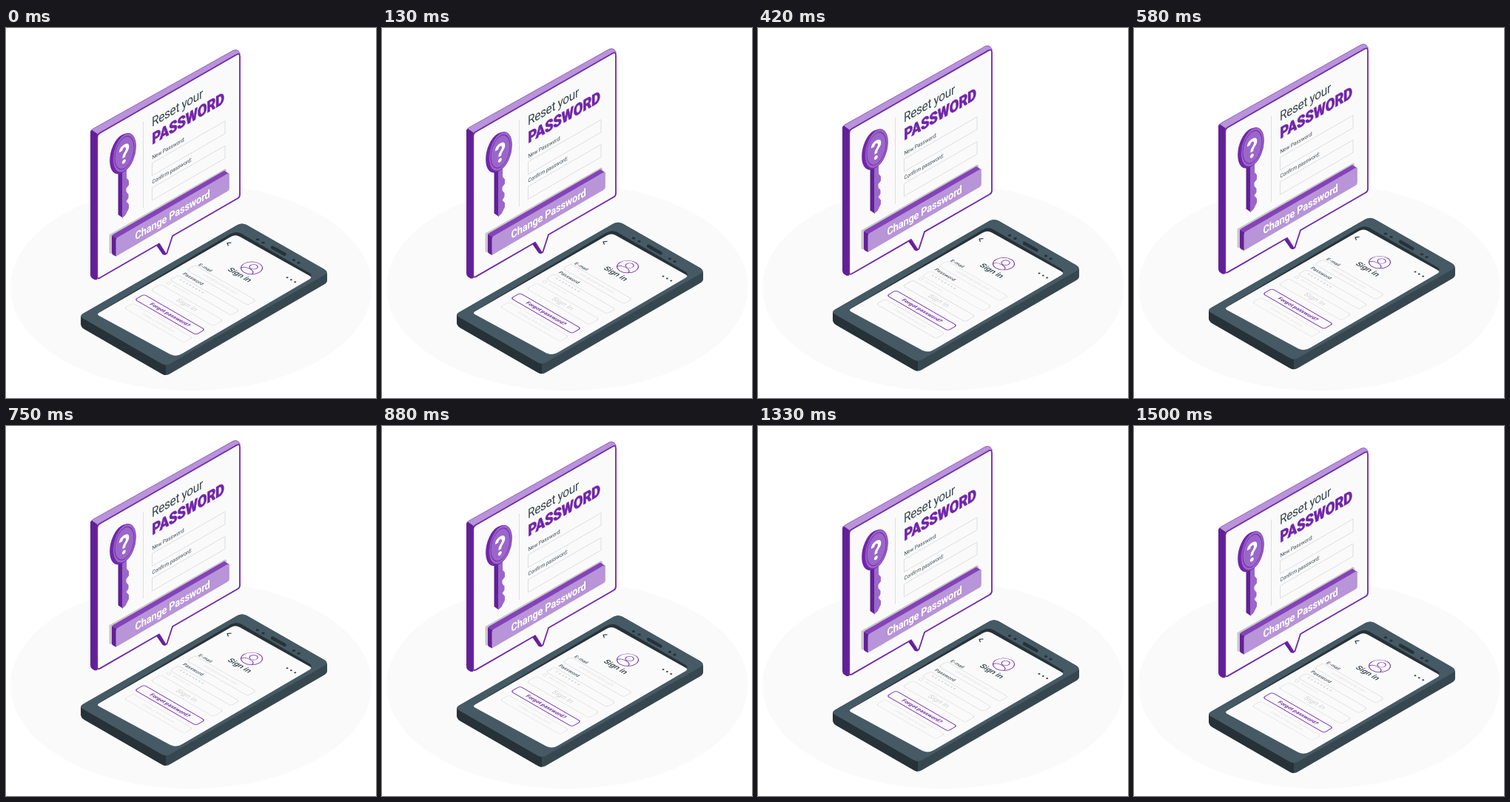
An HTML page that plays this animation: 500x500 px, repeating every 1.54 s.

```html
<!DOCTYPE html>
<html lang="en">
<head>
<meta charset="utf-8">
<title>Reset your password</title>
<style>
  html, body { margin: 0; width: 100%; height: 100%; overflow: hidden; background: #fff; }
  svg { display: block; width: 100vw; height: 100vh; }
  text { font-family: Roboto, sans-serif; }
  .wide text { font-family: Inter, sans-serif; }
</style>
</head>
<body>
<svg id="stage" viewBox="0 0 500 500"></svg>
<script>
const MAIN = '#7126a9', DARK = '#622095', MID = '#9b66ca', LIGHT = '#b894d8';
const PAPER = '#fafafa', INK = '#37474f', NIGHT = '#263238', SLATE = '#455a64', LINE = '#dcdcdc', FAINT = '#e0e0e0';
const LOOP = 1540, SWING = 1500, LIFT = 10;

const path = (d, fill, extra = '') => `<path d="${d}" fill="${fill}" ${extra}/>`;
const line = (d, color, w) => path(d, 'none', `stroke="${color}" stroke-width="${w}" stroke-linecap="round" stroke-linejoin="round"`);
const oval = (x, y, rx, ry, fill, extra = '') => `<ellipse cx="${x}" cy="${y}" rx="${rx}" ry="${ry}" fill="${fill}" ${extra}/>`;

// Isometric planes: the upright panel and the lying screen
const wall = (x, y, body) => `<g transform="matrix(.866 -.5 0 1 ${x} ${y})">${body}</g>`;
const flat = (x, y, body) => `<g transform="matrix(.866 .5 -.866 .5 ${x} ${y})">${body}</g>`;

const label = (str, size, color, weight = 400, extra = '') =>
  `<text font-size="${size}" font-weight="${weight}" fill="${color}" ${extra}>${str}</text>`;
const centred = (x, y, str, size, color, weight) =>
  flat(x, y, label(str, size, color, weight, `text-anchor="middle" y="${size * 0.34}"`));
const pill = (x, y, w, h, color, stroke = 0.9) =>
  flat(x, y, `<rect x="${-w / 2}" y="${-h / 2}" width="${w}" height="${h}" rx="3.5" fill="${PAPER}" stroke="${color}" stroke-width="${stroke}"/>`);

function phone() {
  const dots = (list, r, fill) => list.map(([x, y]) => oval(x, y, r * 1.25, r * 0.85, fill)).join('');
  const avatar = `<g fill="none" stroke="${MAIN}" stroke-width=".9"><circle r="11.8"/><circle cy="-3" r="4.6"/>
    <path d="M-8.6 8.1 Q-8 2.6 0 2.6 Q8 2.6 8.6 8.1"/></g>`;
  const body = [
    path('M104 386 L313 266 Q319 263 325 266 L430 326 Q434 329 434 333 V341 Q434 344 430 346.500 L222 467 Q216 471 210 467 L106 407 Q101 404 101 399 V391 Q101 388 104 386Z', INK),
    path('M101 390 L106 393 L216 456 V469 Q213 469 210 467 L106 407 Q101 404 101 399Z', NIGHT),
    path('M104 386 L313 266 Q319 263 325 266 L430 326 Q437 330 430 334 L222 453.500 Q216 457 210 453.500 L105 393 Q98 389.500 104 386Z', SLATE),
    path('M125 384.500 L303 278.500 Q311 273.800 318 277.800 L410 331 Q415 334 410 338 L300 400 L126 387Z', NIGHT),
    path('M126 384.500 L304 282 Q310 278.500 316 282 L410 334.700 Q414.500 337 410 339.500 L238 440 Q230 445 222 441 L126 389 Q122 386.800 126 384.500Z', PAPER),
    line('M360 296.500 L376.500 305.800', NIGHT, 4.4),
    dots([[340, 285.8], [347.5, 290], [389, 313.5], [395.5, 317.3]], 1.8, NIGHT)
  ];
  const header = [
    line('M304 290.200 L299 290.700 L300.300 294', INK, 1.3),
    dots([[380, 337.2], [385.3, 340.2], [390.7, 343.2]], 1.2, INK),
    flat(332, 324.3, avatar),
    centred(316, 333.6, 'Sign in', 10.3, INK, 600)
  ];
  const form = [
    pill(291, 347.5, 95, 13, FAINT),
    centred(290, 346, 'user@example.com', 5.6, FAINT),
    centred(269.5, 324, 'E-mail', 6.4, INK, 500),
    pill(268.5, 361, 95, 13, FAINT),
    centred(250, 349.5, '* * * * * * * *', 6.2, '#bdbdbd'),
    centred(253, 338.9, 'Password', 6.5, INK, 500),
    flat(220, 344.5, `<rect x="-2" y="-2" width="4" height="4" fill="none" stroke="${FAINT}" stroke-width=".7"/>`),
    centred(237, 354, 'Remember me', 3.8, FAINT),
    pill(244.5, 374.5, 97, 15.5, LINE),
    centred(244.5, 374, 'Sign in', 9.4, '#d6d6d6', 500),
    pill(206, 398.5, 93, 13.5, FAINT),
    centred(206, 398, 'Create a new account', 4.8, FAINT),
    pill(221.5, 387.3, 95, 14, MAIN, 1),
    centred(222, 387.4, 'Forgot password?', 6.9, MAIN, 700)
  ];
  return `<g class="wide">${[...body, ...header, ...form].join('')}</g>`;
}

function key() {
  const head = (x, y, rx, ry, fill, extra) => wall(x, y, oval(0, 0, rx, ry, fill, extra));
  return [
    path('M151.500 192 H158 V256 L151.500 251.500Z', DARK),
    path('M157 192 L163 190 V202 L166 205.500 V211.500 L162.500 216 V220.500 L165.500 224 V229 L162.500 233.500 L166 237.500 V243 L161.500 252 L157 256Z', MID),
    head(156, 169.500, 18.3, 25.5, MAIN),
    head(158, 169, 18.3, 25.5, MAIN),
    head(160, 168, 17.8, 24.8, MID, `stroke="${MAIN}" stroke-width=".7"`),
    head(160, 168, 15, 21, MID, `stroke="${MAIN}" stroke-width=".9"`),
    wall(159.8, 182, label('?', 35, '#fff', 700, 'text-anchor="middle"'))
  ].join('');
}

function field(top) {
  return path(`M197.500 ${top} l98.500 -56.800 v17 l-98.500 56.800Z`, PAPER, `stroke="${LINE}" stroke-width=".9"`);
}

function button() {
  return [
    path('M139.500 278.500 L296 189.500 L298 191 V200 L145 304.500 L139.500 303.500Z', '#c7c7c7'),
    path('M143 281 Q143 279 145 278 L295 192 L302 196.500 L150 286Z', '#8443b8'),
    path('M143 280 L149 283.500 V308 L145 306 Q143 305 143 303Z', DARK),
    path('M148.500 286 Q148.500 283.300 151 282 L299 196.300 Q301.800 194.800 301.800 197.500 V216 Q301.800 218.500 299.500 219.800 L151 306.500 Q148.500 308 148.500 305.500Z', LIGHT),
    wall(174.5, 286, label('Change Password', 14.8, '#fff', 600, 'letter-spacing="-.2"'))
  ].join('');
}

function panel() {
  const frame = [
    path('M114.300 141 Q114.300 138 117.500 136.200 L307 30.300 Q311 28.300 314 31 L316.500 35 L124 148Z', LIGHT, `stroke="${MAIN}" stroke-width=".6"`),
    path('M114 141 Q114 139 116 137.700 L123.500 143 V339.500 Q121 341.200 118.500 339.500 Q114 337.500 114 333Z', DARK),
    path('M202.500 293 L210 303.500 Q212 307.500 216 306.500 L217 300 L208 288Z', DARK),
    path('M123.300 147.500 Q123.300 144 126.300 142.200 L311.500 36 Q316 33.500 316 38.500 V225 Q316 228.500 313 230.300 L225 281 L217.500 304 Q216.500 306 215 304 L207 291.500 L127 337.600 Q123.300 339.500 123.300 336Z',
      PAPER, `stroke="${MAIN}" stroke-width="1.800" stroke-linejoin="round"`)
  ];
  const content = [
    line('M185.500 126 V242', LINE, 0.9),
    wall(197, 133, label('Reset your', 17.8, INK, 400, 'letter-spacing="-.4"')),
    wall(197.3, 157, label('PASSWORD', 21.5, MAIN, 800,
      `letter-spacing="-.3" stroke="${MAIN}" stroke-width=".5" stroke-linejoin="round"`)),
    wall(197.5, 177, label('New Password:', 7.4, INK)),
    field(181.8),
    wall(197.5, 210, label('Confirm password:', 7.4, INK)),
    field(215.2),
    key(),
    button()
  ];
  return frame.join('') + `<g transform="translate(0 .7)">${content.join('')}</g>`;
}

const stage = document.getElementById('stage');
stage.innerHTML = oval(250.3, 350.3, 244.2, 140, PAPER) + `<g id="float">${phone()}${panel()}</g>`;
const float = document.getElementById('float');

// Steady rise and fall, then a short rest before the loop restarts
function draw(now) {
  const t = Math.min(now % LOOP, SWING);
  const rise = LIFT * (1 - Math.abs(1 - 2 * t / SWING));
  float.setAttribute('transform', `translate(0 ${-rise.toFixed(3)})`);
}

function tick() {
  draw(performance.now());
  requestAnimationFrame(tick);
}
tick();
</script>
</body>
</html>
```
